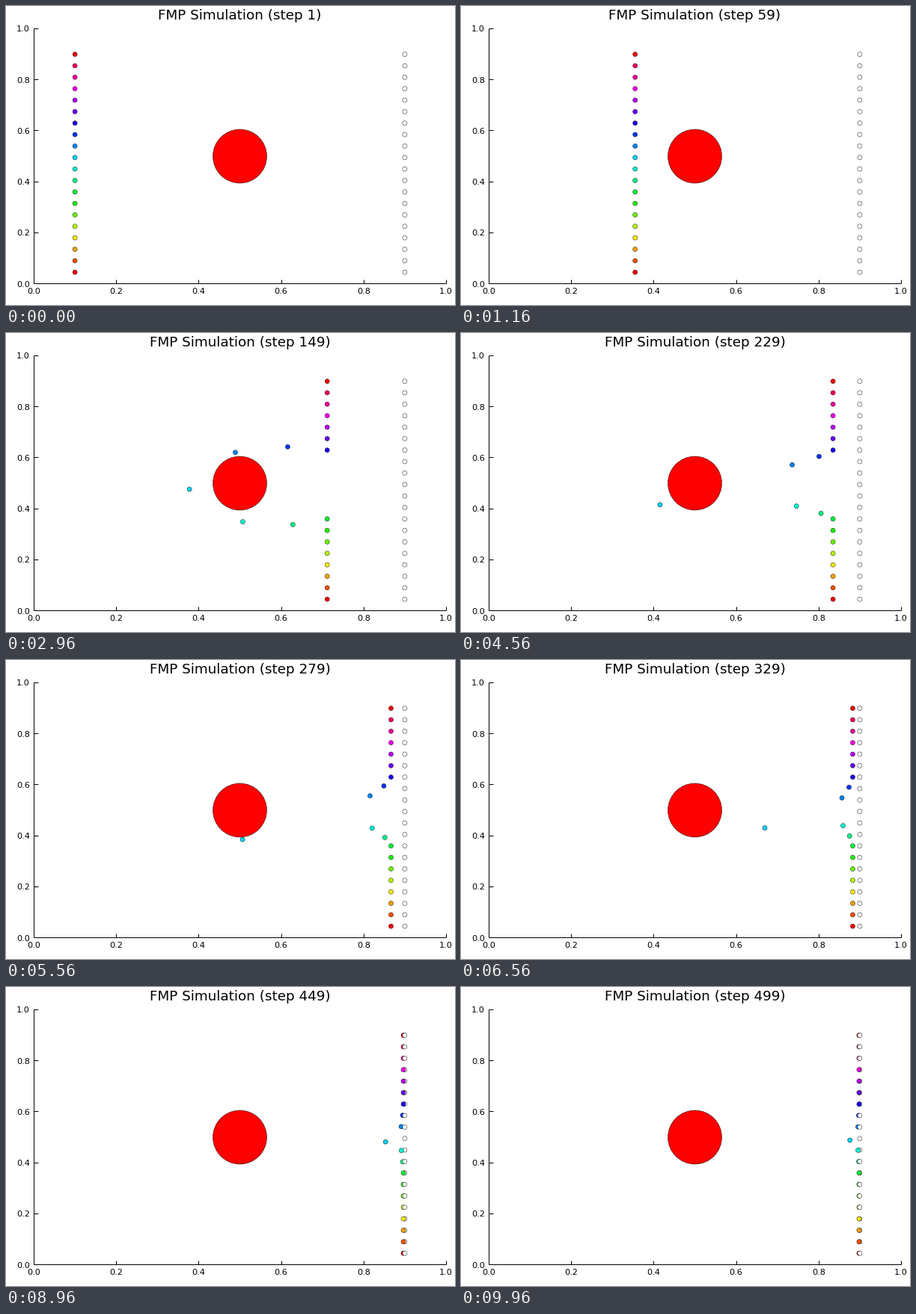
These frames come from a looping animation (600x400 px, 10 s). A matplotlib script:

```python
import colorsys
import math

import matplotlib.pyplot as plt
import numpy as np
from matplotlib.animation import FuncAnimation
from matplotlib.patches import Circle

W, H, DPI = 600, 400, 100
PT = 72 / DPI  # points per pixel
FRAMES, INTERVAL = 250, 40

COUNT = 20
START_X, GOAL_X = 0.1, 0.9
CENTER, CONTACT_R = 0.5, 0.13
SPEED, EXIT_SPEED = 0.0045, 0.0034  # per step, before and after a detour
DECAY = 0.0133                      # share of the remaining way per step
LAG = 1.3                           # steps lost while speeding up

# Step and place where each deflected agent leaves the obstacle.
EXITS = {9: (149, .6285, .338), 10: (149, .507, .349), 11: (277, .5, .3835),
         12: (149, .489, .621), 13: (149, .616, .643)}
GOALS_IN_FRONT = {1, 5, 6, 7, 9, 11, 12, 13, 18, 19, 20}


def px(x):
    return 37 + 551 * x


def py(y):
    return 371.5 - 341 * y


def row(i):
    return 0.045 * i


def remaining(dist, t, speed):
    """Way left after t steps: constant speed, then exponential braking."""
    brake = min(dist, speed / DECAY)
    cruise = (dist - brake) / speed
    if t < cruise:
        return dist - speed * t
    return brake * math.exp(-DECAY * (t - cruise))


def free_x(step):
    t = step - 1
    t -= LAG * (1 - math.exp(-t / LAG))
    return GOAL_X - remaining(GOAL_X - START_X, t, SPEED)


def polar(x, y):
    """Distance from the obstacle's centre and angle from its left side."""
    dx, dy = x - CENTER, abs(y - CENTER)
    return math.hypot(dx, dy), math.atan2(dy, -dx)


def detour(i, step):
    """Straight up to the obstacle, around its rim, then on to the goal."""
    y0 = row(i)
    x0 = CENTER - math.sqrt(CONTACT_R ** 2 - (y0 - CENTER) ** 2)
    contact = 1 + LAG + (x0 - START_X) / SPEED
    leave, x1, y1 = EXITS[i]
    if step <= contact:
        return free_x(step), y0
    if step >= leave:
        dist = math.hypot(GOAL_X - x1, y0 - y1)
        left = remaining(dist, step - leave, EXIT_SPEED) / dist
        return GOAL_X - (GOAL_X - x1) * left, y0 - (y0 - y1) * left
    # A point pulled around a circle moves evenly in log(tan(angle / 2)).
    u = (step - contact) / (leave - contact)
    (r0, a0), (r1, a1) = polar(x0, y0), polar(x1, y1)
    r = r0 + (r1 - r0) * u
    a = 2 * math.atan(math.tan(a0 / 2) ** (1 - u) * math.tan(a1 / 2) ** u)
    side = math.copysign(1, y0 - CENTER)
    return CENTER - r * math.cos(a), CENTER + side * r * math.sin(a)


def place(i, step):
    return detour(i, step) if i in EXITS else (free_x(step), row(i))


plt.rcParams["font.family"] = "DejaVu Sans"
fig = plt.figure(figsize=(W / DPI, H / DPI), dpi=DPI, facecolor="white")
ax = fig.add_axes([0, 0, 1, 1])
ax.set_xlim(0, W)
ax.set_ylim(H, 0)
ax.axis("off")


def line(xs, ys):
    ax.plot(xs, ys, color="black", lw=PT, solid_capstyle="butt", snap=True)


def label(x, y, text, size, ha="center"):
    return ax.text(x, y, text, fontsize=size * PT, ha=ha, va="baseline",
                   color="black")


def disc(x, y, r, color, z):
    return ax.add_patch(Circle((px(x), py(y)), r, facecolor=color,
                               edgecolor="black", lw=0.45 * PT, zorder=z))


left, right, bottom, top = 37, 588, 371, 30
line([left, right], [bottom, bottom])
line([left, left], [top, bottom])
for v in np.arange(6) / 5:
    x = left + v * (right - left)
    y = bottom + v * (top - bottom)
    line([x, x], [bottom, bottom - 5])
    line([left, left + 6], [y, y])
    label(x, 385, f"{v:.1f}", 11.2)
    label(32, y + 4.5, f"{v:.1f}", 11.2, ha="right")

title = label(312.5, 18, "", 18.4)
disc(CENTER, CENTER, 36, "red", 2)

dots = {}
for i in range(1, COUNT + 1):
    hue = (i - 1) / (COUNT - 1)
    disc(GOAL_X, row(i), 3, "white", 5 if i in GOALS_IN_FRONT else 3)
    dots[i] = disc(START_X, row(i), 3, colorsys.hsv_to_rgb(hue, 1, 1), 4)


def draw(n):
    step = 2 * n + 1
    title.set_text(f"FMP Simulation (step {step})")
    for i, dot in dots.items():
        x, y = place(i, step)
        dot.center = px(x), py(y)
    return [title, *dots.values()]


anim = FuncAnimation(fig, draw, frames=FRAMES, interval=INTERVAL,
                     repeat=True, repeat_delay=0, blit=False)
plt.show()
```
